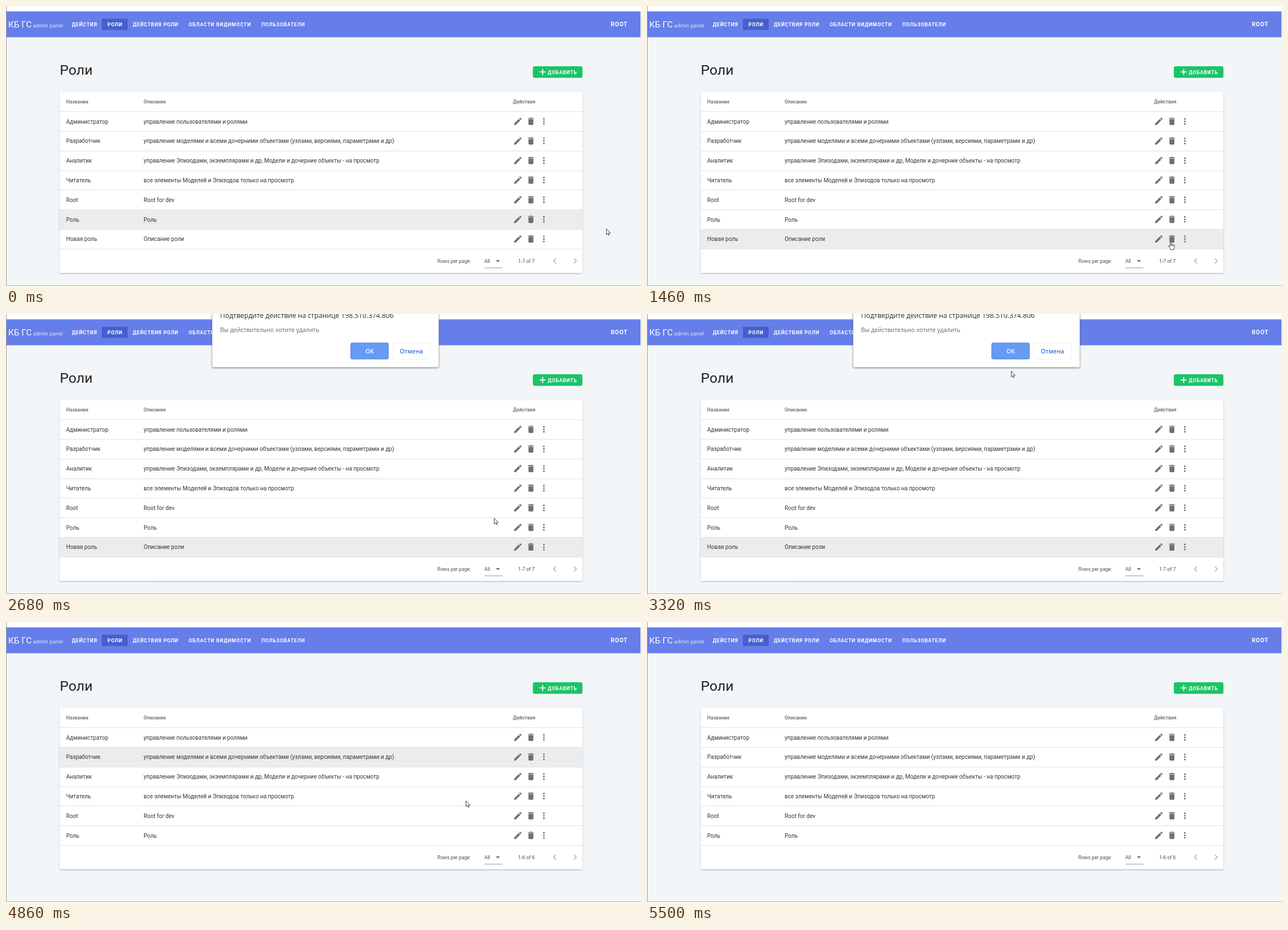
Write an HTML page that moves like this. It is 1127 by 497 pixels and loops after 5.96 s.

```html
<!DOCTYPE html>
<html lang="ru">
<head>
<meta charset="utf-8">
<title>Роли</title>
<style>
html, body { margin: 0; width: 100%; height: 100%; overflow: hidden; background: #f2f6f9; }
svg { display: block; width: 1127px; height: 497px; font-family: Roboto, sans-serif; }
.nav { font-size: 8.7px; font-weight: 700; letter-spacing: .777px; fill: #fff; }
.th { font-size: 8.7px; font-weight: 700; fill: #7c7c7c; }
.td { font-size: 10.08px; fill: #353535; }
.foot { font-size: 8.7px; fill: #4c4c4c; }
.dlg { font-family: "Open Sans", "Noto Sans", sans-serif; }
</style>
</head>
<body>
<svg viewBox="0 0 1127 497" xmlns="http://www.w3.org/2000/svg">
  <defs>
    <filter id="cardShadow" x="-5%" y="-5%" width="110%" height="112%">
      <feDropShadow dx="0" dy="1.2" stdDeviation="1" flood-color="#000" flood-opacity=".28"/>
    </filter>
    <filter id="dlgShadow" x="-5%" y="-20%" width="110%" height="140%">
      <feDropShadow dx="0" dy="1" stdDeviation="1.7" flood-color="#000" flood-opacity=".5"/>
    </filter>
    <g id="tools" fill="#707070">
      <path transform="translate(899.8 -8.7) scale(.725)" d="M20.71 7.04C21.1 6.65 21.1 6 20.71 5.63L18.37 3.29C18 2.9 17.35 2.9 16.96 3.29L15.12 5.12L18.87 8.87M3 17.25V21H6.75L17.81 9.93L14.06 6.18Z"/>
      <path transform="translate(922.9 -8.7) scale(.725)" d="M19 4H15.5L14.5 3H9.5L8.5 4H5V6H19M6 19A2 2 0 0 0 8 21H16A2 2 0 0 0 18 19V7H6Z"/>
      <circle cx="954.6" cy="-4.4" r="1.5"/><circle cx="954.6" r="1.5"/><circle cx="954.6" cy="4.4" r="1.5"/>
    </g>
  </defs>

  <rect width="1127" height="497" fill="#f2f6f9"/>
  <rect width="1127" height="10" fill="#fff"/>
  <rect y="9.5" width="1126" height="46" fill="#667eea"/>
  <text x="4" y="38" font-size="15.5" fill="#fff">КБ ГС</text>
  <text x="48" y="38" font-size="9.7" fill="#dbe1fb">admin panel</text>
  <rect x="170" y="22.5" width="46" height="20" rx="1.5" fill="#4560cd"/>
  <text id="nav" class="nav" x="116.8" y="35.7"></text>
  <text x="1073.5" y="36.2" fill="#fff" font-size="10.15" font-weight="700" letter-spacing=".906">ROOT</text>

  <text x="95.5" y="121.6" font-size="24.65" letter-spacing=".18" fill="#212121">Роли</text>
  <rect x="935" y="107.6" width="88" height="20.3" rx="3" fill="#000" opacity=".12"/>
  <rect x="935" y="107" width="88" height="20.3" rx="3" fill="#1bc467"/>
  <path d="M947.3 117.2H957.7M952.5 112V122.4" stroke="#fff" stroke-width="1.8"/>
  <text class="nav" x="961.5" y="120.5">ДОБАВИТЬ</text>

  <rect id="card" x="95" y="153" width="928" rx="2.5" fill="#fff" filter="url(#cardShadow)"/>
  <g class="th">
    <text x="106.8" y="172.7">Название</text>
    <text x="244.3" y="172.7">Описание</text>
    <text x="899.8" y="172.7">Действия</text>
  </g>
  <rect id="hover" x="95" width="928" height="34.8" fill="#ececec"/>
  <g id="rows"></g>
  <g id="footer" class="foot">
    <path d="M95 -21H1023" stroke="#e2e2e2"/>
    <text x="765.8" y="3.1">Rows per page:</text>
    <text x="849" y="3.1">All</text>
    <path d="M869.3 -1.4H876.7L873 2.3Z" fill="#707070"/>
    <path d="M849 12.3H881" stroke="#8c8c8c" stroke-width=".9"/>
    <text id="count" x="909" y="3.1"></text>
    <path d="M976 -4.2L971.8 0L976 4.2M1008 -4.2L1012.2 0L1008 4.2" fill="none" stroke="#aaa" stroke-width="1.3"/>
  </g>

  <g id="dialog" class="dlg">
    <rect x="366" y="-40" width="402" height="134.5" rx="2.5" fill="#fff" stroke="#b9bcc4" stroke-width=".6" filter="url(#dlgShadow)"/>
    <text x="380" y="7" font-size="12.2" fill="#2b2b2b">Подтвердите действие на странице 198.510.374.806</text>
    <text x="380" y="32.2" font-size="10.6" fill="#666">Вы действительно хотите удалить</text>
    <rect x="611.8" y="51.2" width="67" height="28.8" rx="2.5" fill="#659af5" stroke="#5580d2" stroke-width=".9"/>
    <rect x="686.3" y="51.5" width="67" height="28.5" rx="2.5" fill="#fff" stroke="#e8eaee" stroke-width=".9"/>
    <g font-size="10.6" font-weight="600" text-anchor="middle">
      <text x="645.5" y="69.7" fill="#fff">ОК</text>
      <text x="719.6" y="69.7" fill="#3a70d6">Отмена</text>
    </g>
  </g>

  <path d="M.5 0V497" stroke="#999"/>
  <path d="M0 496.5H1127" stroke="#b4b4b4"/>

  <path id="arrow" d="M.5 .5V10.7L2.8 8.6L4.3 12L5.9 11.3L4.5 8H7.5Z" fill="#fff" stroke="#222" stroke-width=".85"/>
  <g id="hand" fill="#fff" stroke="#222" stroke-width=".85" stroke-linejoin="round">
    <path d="M3.6 8.7V1.6Q3.6 .5 4.6 .5Q5.6 .5 5.6 1.6V5.2Q7.3 4.6 7.5 5.7Q9.1 5.1 9.4 6.3Q11.2 5.9 11.2 7.5V10.3L9.9 13V14.8H4.4V13L1 8.9Q.3 7.8 1.3 7.2Q2.1 6.9 3.6 8.7Z"/>
    <path d="M5.6 5.2V8M7.5 5.7V8.1M9.4 6.3V8.3" fill="none"/>
  </g>
</svg>
<script>
const LOOP = 5960, TOP = 187.7, ROW = 34.8;
const OPEN = 2290, SETTLED = 2410, CLOSE = 4130, REMOVED = 4450;
const NS = "http://www.w3.org/2000/svg";
const $ = id => document.getElementById(id);

function add(parent, tag, attrs, text) {
  const el = document.createElementNS(NS, tag);
  for (const k in attrs) el.setAttribute(k, attrs[k]);
  if (text) el.textContent = text;
  return parent.appendChild(el);
}

["ДЕЙСТИЯ", "РОЛИ", "ДЕЙСТВИЯ РОЛИ", "ОБЛАСТИ ВИДИМОСТИ", "ПОЛЬЗОВАТЕЛИ"]
  .forEach((s, i) => add($("nav"), "tspan", { dx: i ? 18.1 : 0 }, s));

const rows = [
  ["Администратор", "управление пользователями и ролями"],
  ["Разработчик", "управление моделями и всеми дочерними объектами (узлами, версиями, параметрами и др)"],
  ["Аналитик", "управление Эпизодами, экземплярами и др, Модели и дочерние объекты - на просмотр"],
  ["Читатель", "все элементы Моделей и Эпизодов только на просмотр"],
  ["Root", "Root for dev"],
  ["Роль", "Роль"],
  ["Новая роль", "Описание роли"]
].map(([name, about], i) => {
  const y = TOP + i * ROW;
  const g = add($("rows"), "g", { class: "td" });
  add(g, "path", { d: `M95 ${Math.floor(y) + .5}H1023`, stroke: "#e2e2e2" });
  add(g, "text", { x: 106.8, y: y + 20.8 }, name);
  add(g, "text", { x: 244.3, y: y + 20.8 }, about);
  add(g, "use", { href: "#tools", y: y + 17 });
  return g;
});

// Pointer glides: key points are [step number, x, y], eased in between.
const glides = [
  { start: 430, step: 147, keys: [[0, 1065, 395], [3, 959, 458], [5, 944, 430], [7, 925, 418]] },
  { start: 2552, step: 128, keys: [[0, 925, 418], [3, 697, 203], [6, 646, 101], [8, 640, 58]] },
  { start: 4450, step: 131, keys: [[0, 640, 66], [1, 651, 109], [2, 735, 232], [3, 816, 317], [5, 950, 434], [8, 1093, 505]] }
];

const ease = u => u * u * (3 - 2 * u);

function along(keys, n) {
  const last = keys.length - 1;
  n = Math.min(Math.max(n, 0), keys[last][0]);
  const i = Math.min(keys.findLastIndex(k => k[0] <= n), last - 1);
  const [a, ax, ay] = keys[i], [b, bx, by] = keys[i + 1];
  const u = ease((n - a) / (b - a));
  return { x: Math.round(ax + (bx - ax) * u), y: Math.round(ay + (by - ay) * u) };
}

// The pointer now and one step earlier; hover effects lag by that step.
function pointer(t) {
  const { start, step, keys } = glides.findLast(g => g.start <= t) || glides[0];
  const n = Math.floor((t - start) / step);
  return [along(keys, n), along(keys, n - 1)];
}

function dialogAt(t) {
  if (t < OPEN || t >= REMOVED) return { alpha: 0, dy: 0 };
  if (t >= CLOSE) return { alpha: .06, dy: -16 };
  return t < SETTLED ? { alpha: .85, dy: -7.5 } : { alpha: 1, dy: 0 };
}

const rowAt = p => Math.floor((p.y - TOP) / ROW);
const onTrash = p => Math.abs(p.x - 931.5) < 9 && rowAt(p) >= 0;
const show = (el, on) => el.setAttribute("visibility", on ? "visible" : "hidden");
const shift = (el, x, y) => el.setAttribute("transform", `translate(${x} ${y})`);

function draw(t) {
  const n = t < REMOVED ? 7 : 6;
  const bottom = TOP + n * ROW;
  rows.forEach((g, i) => show(g, i < n));
  $("card").setAttribute("height", bottom + 42.4 - 153);
  shift($("footer"), 0, Math.floor(bottom) + 21.5);
  $("count").textContent = `1-${n} of ${n}`;

  const { alpha, dy } = dialogAt(t);
  show($("dialog"), alpha > 0);
  $("dialog").setAttribute("opacity", alpha);
  shift($("dialog"), 0, dy);

  const [now, before] = pointer(t);
  const inside = rowAt(now) >= 0 && rowAt(now) < n;
  const row = alpha > .5 ? n - 1 : inside ? rowAt(before) : -1;
  show($("hover"), row >= 0 && row < n);
  $("hover").setAttribute("y", TOP + row * ROW);

  const pointing = onTrash(now) && onTrash(before);
  show($("hand"), pointing);
  show($("arrow"), !pointing);
  shift($("hand"), now.x, now.y);
  shift($("arrow"), now.x, now.y);
}

const start = performance.now();
function tick() {
  draw((performance.now() - start) % LOOP);
  requestAnimationFrame(tick);
}
tick();
</script>
</body>
</html>
```
